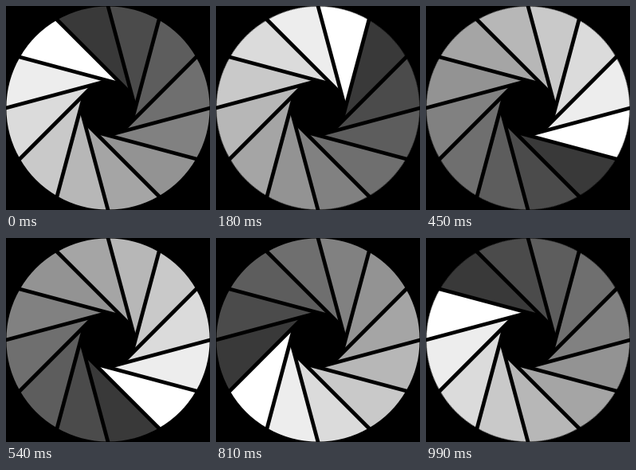
These frames come from a looping animation (256 by 256 pixels, 1080 ms). An HTML page:

```html
<!DOCTYPE html>
<html lang="en">
<head>
<meta charset="utf-8">
<title>Aperture spinner</title>
<style>
  html, body { margin: 0; width: 100%; height: 100%; overflow: hidden; background: #000; }
  svg { display: block; width: 100vw; height: 100vh; filter: blur(.4px); }
  #blades { animation: turn 1080ms steps(12, end) infinite; }
  #gaps { stroke: #000; stroke-width: 4.8; }
  @keyframes turn { to { transform: rotate(360deg); } }
</style>
</head>
<body>
<svg viewBox="-128 -128 256 256">
  <defs>
    <path id="blade" d="M0-127.6A127.6 127.6 0 0 1 63.8-110.5L34.2 0Z"/>
    <path id="gap" d="M-.54-130L34.3 0"/>
  </defs>
  <g id="blades"></g>
  <g id="gaps"></g>
</svg>
<script>
  const COUNT = 12;

  function place(shape, group, turn, fill) {
    const use = document.createElementNS('http://www.w3.org/2000/svg', 'use');
    use.setAttribute('href', '#' + shape);
    use.setAttribute('transform', `rotate(${turn * 360 / COUNT})`);
    if (fill) use.setAttribute('fill', fill);
    document.getElementById(group).append(use);
  }

  // The white blade starts at the upper left; shades darken anticlockwise.
  for (let i = 0; i < COUNT; i++) {
    const grey = 255 - 18 * i;
    place('blade', 'blades', 10 - i, `rgb(${grey},${grey},${grey})`);
    place('gap', 'gaps', i);
  }
</script>
</body>
</html>
```
